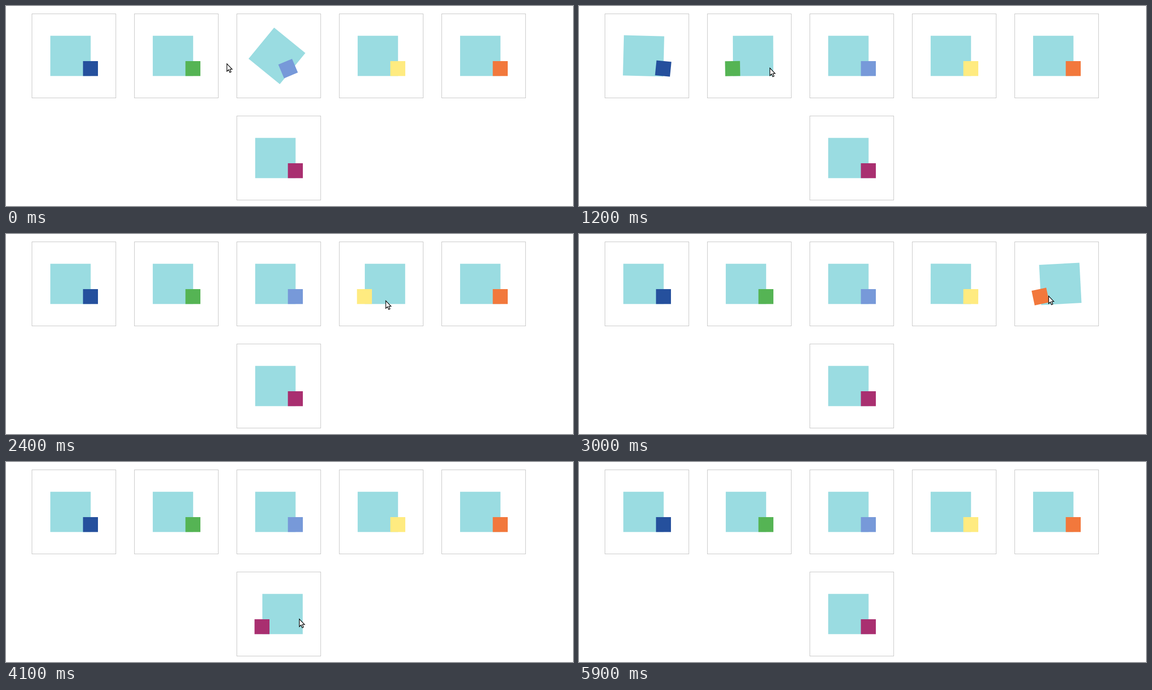
Write an HTML page that moves like this. It is 1190x421 px and loops after 6200 ms.

```html
<!DOCTYPE html>
<html lang="en">
<head>
<meta charset="utf-8">
<title>Hover squares</title>
<style>
  html, body { margin: 0; width: 100%; height: 100%; overflow: hidden; background: #fff; }
  svg { display: block; }
  .frame { fill: #fff; stroke: #c3c3c3; }
  .big { fill: #9adce1; }
  .pointer { fill: #fff; stroke: #000; stroke-width: 1.3; }
</style>
</head>
<body>
<svg id="stage" width="1190" height="421" viewBox="0 0 1190 421"></svg>
<script>
const LOOP = 6200, STEP = 100, TURN = 300;
const PITCH = 215, COLUMNS = 5;
const stage = document.getElementById('stage');

// visits: [pointer enters, pointer leaves]
const tiles = [
  { color: '#25509d', visits: [[79, 935], [5420, 5600]] },
  { color: '#55b454', visits: [[915, 1498]] },
  { color: '#7799d9', visits: [[-600, -144], [1575, 2040]] },
  { color: '#ffeb80', visits: [[2095, 2710]] },
  { color: '#f2783c', visits: [[2750, 3172]] },
  { color: '#a92f70', visits: [[3675, 5244]] }
];

// Stops of the pointer, with straight runs between them.
const stops = [
  { x: 463, y: 121, from: 0, to: 0 },
  { x: 155, y: 120, from: 200, to: 800 },
  { x: 239, y: 115, from: 900, to: 900 },
  { x: 400, y: 130, from: 1200, to: 1400 },
  { x: 574.5, y: 133, from: 1700, to: 1700 },
  { x: 600, y: 136, from: 1900, to: 2000 },
  { x: 796.5, y: 140, from: 2400, to: 2700 },
  { x: 985, y: 130, from: 3000, to: 3150 },
  { x: 677, y: 280, from: 3400, to: 3500 },
  { x: 615, y: 330, from: 3900, to: 4300 },
  { x: 612, y: 315, from: 4500, to: 5100 },
  { x: 517, y: 294, from: 5200, to: 5200 },
  { x: 213, y: 153, from: 5400, to: 5400 },
  { x: 150, y: -40, from: 5800, to: LOOP }
];

function add(tag, attrs, parent = stage) {
  const el = document.createElementNS('http://www.w3.org/2000/svg', tag);
  for (const key in attrs) el.setAttribute(key, attrs[key]);
  return parent.appendChild(el);
}

function square(size, attrs, parent) {
  return add('rect', { x: -size / 2, y: -size / 2, width: size, height: size, ...attrs }, parent);
}

function place(el, x, y, angle = 0) {
  el.setAttribute('transform', `translate(${x} ${y}) rotate(${angle})`);
}

// CSS "ease": cubic-bezier(.25, .1, .25, 1)
function ease(x) {
  if (x <= 0) return 0;
  if (x >= 1) return 1;
  const curve = (a, b, s) => 3 * a * s * (1 - s) ** 2 + 3 * b * s * s * (1 - s) + s ** 3;
  let lo = 0, hi = 1;
  for (let i = 0; i < 30; i++) {
    const mid = (lo + hi) / 2;
    if (curve(0.25, 0.25, mid) < x) lo = mid; else hi = mid;
  }
  return curve(0.1, 1, lo);
}

function hover(visits, t) {
  return visits.reduce((sum, [enter, leave]) =>
    sum + ease((t - enter) / TURN) - ease((t - leave) / TURN), 0);
}

function pointAt(t) {
  const next = stops.findIndex(stop => t <= stop.to);
  const b = stops[next], a = stops[next - 1] || b;
  const k = t >= b.from ? 1 : (t - a.to) / (b.from - a.to);
  return [a.x + (b.x - a.x) * k, a.y + (b.y - a.y) * k];
}

tiles.forEach((tile, i) => {
  const row = Math.floor(i / COLUMNS);
  const column = row ? 2 : i;
  const g = add('g');
  place(g, 54 + PITCH * column, 16 + PITCH * row);
  add('rect', { class: 'frame', x: 0.5, y: 0.5, width: 176, height: 177 }, g);
  tile.big = square(84.7, { class: 'big' }, g);
  tile.small = square(31.4, { fill: tile.color }, g);
});

const pointer = add('path', {
  class: 'pointer',
  d: 'M.6 .6V16.6L4.3 13.2 6.7 18.8 9.4 17.6 7 12.1H11.6Z'
});

function draw(time) {
  const t = Math.floor((time % LOOP) / STEP) * STEP;
  for (const { big, small, visits } of tiles) {
    const p = hover(visits, t);
    place(big, 81.4 + 15 * p, 89, 180 * p);
    place(small, 123.3 - 70 * p, 115.7, 720 * p);
  }
  place(pointer, ...pointAt(t));
}

const begin = performance.now();
function loop() {
  draw(performance.now() - begin);
  requestAnimationFrame(loop);
}
loop();
</script>
</body>
</html>
```
